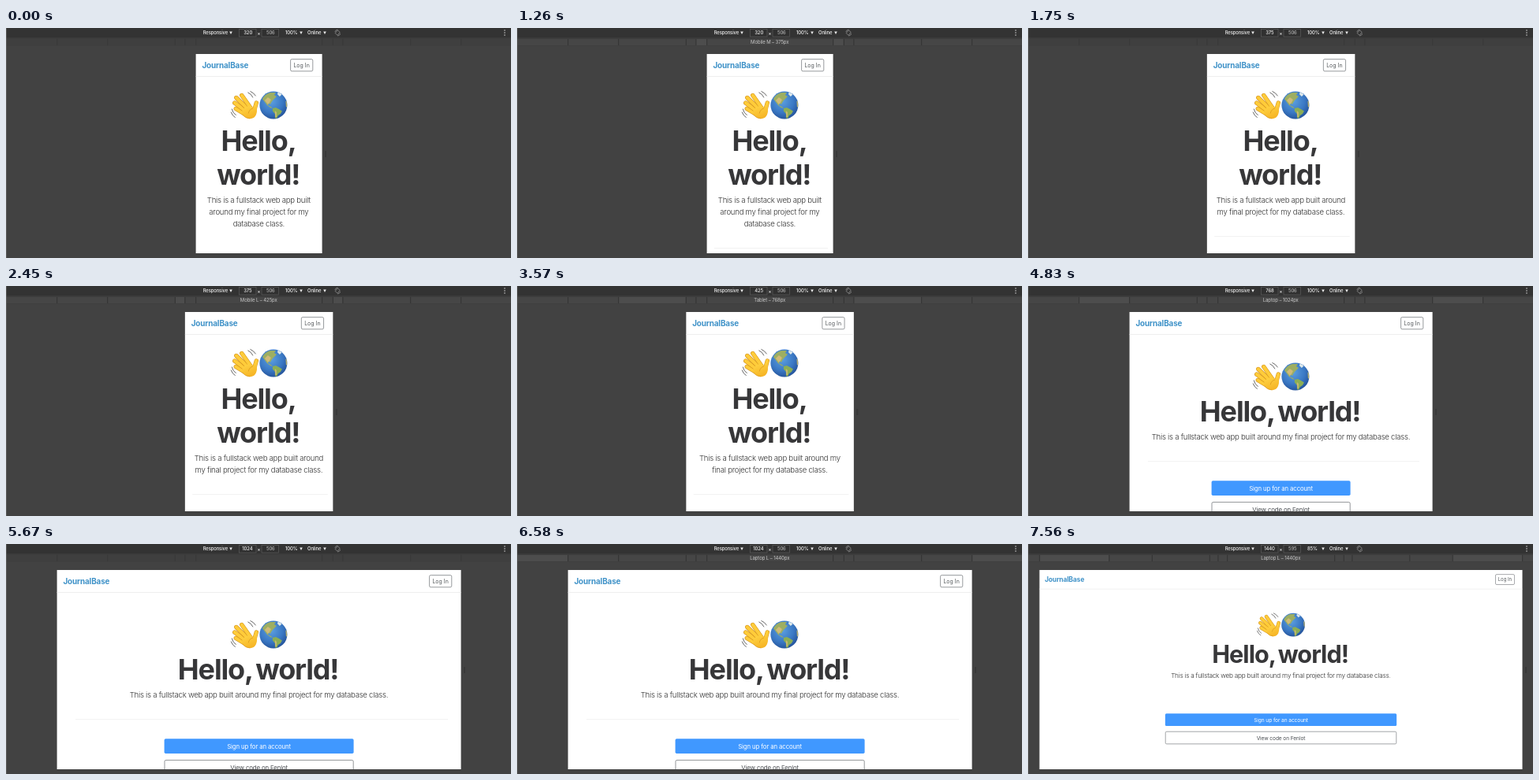
These frames come from a looping animation (640x292 px, 7630 ms). An HTML page:

```html
<!DOCTYPE html>
<html lang="en">
<head>
<meta charset="utf-8">
<title>Responsive page preview</title>
<style>
html, body { margin: 0; width: 100%; height: 100%; overflow: hidden; background: #424242; }
svg { display: block; width: 100vw; height: 100vh; font-family: Inter, "Liberation Sans", sans-serif; }
.tool { font-size: 5.9px; font-weight: 500; letter-spacing: -.12px; fill: #f0f0f0; }
.tool .dim { fill: #b0b0b0; }
.tag { font-size: 6px; letter-spacing: -.1px; fill: #c8c8c8; text-anchor: middle; }
.brand { font-size: 9.9px; font-weight: 700; letter-spacing: -.12px; fill: #3f92c8; }
.login { font-size: 7px; fill: #55595c; text-anchor: middle; }
.title { font-size: 36px; font-weight: 700; letter-spacing: -1.15px; word-spacing: -3px; fill: #373739; text-anchor: middle; }
.lead { font-size: 9.6px; font-weight: 300; letter-spacing: -.25px; fill: #333; text-anchor: middle; }
.btn { font-size: 7.8px; letter-spacing: -.12px; text-anchor: middle; }
</style>
</head>
<body>
<svg id="stage" viewBox="0 0 640 292" preserveAspectRatio="none">
  <defs>
    <radialGradient id="sea" cx=".42" cy=".35" r=".7">
      <stop offset="0" stop-color="#5c9fe0"/><stop offset=".6" stop-color="#3a78c4"/><stop offset="1" stop-color="#234f95"/>
    </radialGradient>
    <linearGradient id="skin" x1="0" y1="0" x2=".5" y2="1">
      <stop offset="0" stop-color="#ffd445"/><stop offset="1" stop-color="#f6b526"/>
    </linearGradient>
    <clipPath id="disc"><circle r="17.3"/></clipPath>
    <clipPath id="view"><rect y="33" width="640" height="253"/></clipPath>
    <g id="hand" fill="none" stroke-linecap="round" stroke-linejoin="round">
      <g id="fingers"></g>
      <path d="M-4 9.500Q-3 4 1 2.500Q5 0 9 3L14.500 2Q16 8 14 12.500Q11 18 5 17Q-1 16 -4 9.500Z" fill="url(#skin)"/>
      <path d="M4.500 10Q5.500 5 10 4M-3 12Q0 16.500 6 16.800" stroke="#dc9a1c" stroke-width=".8"/>
      <path d="M-16.500 5Q-15.500 10 -11.500 12.500M-17.500 9Q-16 13.500 -12.500 15.500M4 -16Q8 -14.500 10 -10M7 -17.500Q11.500 -15.500 13.500 -12" stroke="#555" stroke-width=".9"/>
    </g>
    <g id="globe">
      <circle r="17.500" fill="url(#sea)"/>
      <g clip-path="url(#disc)">
        <path d="M-14 -8Q-11 -14 -4 -16L3 -16L1 -13L4 -11L1 -8L-1 -6L-3 -3L-4 -1L-6 -2.500L-7 0L-3 2L-1 4L-4 3L-8 0L-11 -4Z" fill="#9dae62"/>
        <path d="M-11 -6L-7 -10L-3 -7L-5 -3L-7 -1Z" fill="#d0ba78"/>
        <path d="M-1 4L3 3L7 5L11 7.500L9 11L6 13L4 17L2 16L2 11L-1 7.500Z" fill="#8bae55"/>
        <path d="M2 7L4 9L4 15L2.500 15L2 10Z" fill="#cbb872"/>
        <path d="M6 -17L11 -14L8 -11L5 -14Z" fill="#dfe9ea"/>
        <path d="M15.500 -5L19 -7V4L16 2Z" fill="#b9b06c"/>
      </g>
    </g>
  </defs>
  <g id="scene"></g>
</svg>
<script>
const LOOP = 7630;
const scene = document.getElementById("scene");
const presets = [320, 375, 425, 768, 1024, 1440];
const names = { 375: "Mobile M", 425: "Mobile L", 768: "Tablet", 1024: "Laptop", 1440: "Laptop L" };
// time, page width, hovered preset
const steps = [
  [0, 320, 0], [1120, 320, 375], [1400, 375, 375], [1470, 375, 0],
  [2310, 375, 425], [2660, 425, 425], [2940, 425, 0],
  [3430, 425, 768], [3780, 768, 768], [3990, 768, 0],
  [4830, 768, 1024], [5180, 1024, 1024], [5460, 1024, 0],
  [6440, 1024, 1440], [6790, 1440, 1440]
];
const buttonWidth = { 768: 176, 1024: 240, 1440: 345 };
const leads = {
  320: ["This is a fullstack web app built", "around my final project for my", "database class."],
  375: ["This is a fullstack web app built around", "my final project for my database class."],
  425: ["This is a fullstack web app built around my", "final project for my database class."]
};
const fingers = ["M12 8Q12.500 3 14.500 -3", "M1 12L-11.500 4.500", "M3 9L-13 -3", "M6 7L-11 -9.500", "M9 6L-4 -12.500"];
document.getElementById("fingers").innerHTML = fingers.map(d =>
  `<path d="${d}" stroke="#d2921f" stroke-width="5.400"/><path d="${d}" stroke="#ffcc3a" stroke-width="4.200"/>`).join("");

const text = (cls, x, y, s) => `<text class="${cls}" x="${x}" y="${y}">${s}</text>`;
const rect = (x, y, w, h, fill, more = "") =>
  `<rect x="${x}" y="${y}" width="${w}" height="${h}" fill="${fill}" ${more}/>`;
const arrow = x => `<path d="M${x - 1.8} 4.500h3.600l-1.800 3.400z" fill="#eee"/>`;

function toolbar(w, zoom) {
  const field = 'stroke="#5c5c5c" stroke-width=".7"';
  const wx = w > 999 ? 299.3 : 301.3;
  return rect(0, 0, 640, 12.5, "#333") + `<g class="tool">` +
    text("", 249.7, 8.2, "Responsive") + arrow(285) +
    rect(295.5, 1.5, 21.5, 9.5, "#303030", field) + text("", wx, 8.2, w) +
    text("", 318.6, 9, "×") +
    rect(324, 1.5, 21.5, 9.5, "#303030", field) + text("dim", 330, 8.2, zoom < 1 ? 595 : 506) +
    text("", 354, 8.2, zoom < 1 ? "85%" : "100%") + arrow(374) +
    text("", 382, 8.2, "Online") + arrow(404) + `</g>` +
    `<g fill="none" stroke="#999" stroke-width=".7"><rect x="418.200" y="3.500" width="4" height="5" rx=".6" transform="rotate(40 420.200 6)"/>` +
    `<path d="M416.800 5Q417.500 2.300 420.500 2.100M423.800 7Q423 9.800 420 10"/></g>` +
    [3, 6, 9].map(y => `<circle cx="632" cy="${y}" r=".8" fill="#ccc"/>`).join("");
}

function ruler(hover, zoom) {
  let out = rect(0, 12.5, 640, 10, "#3c3c3c") + rect(0, 14, 640, 8, hover ? "#464646" : "#3f3f3f");
  const half = presets.map(p => p * zoom / 4);
  const i = presets.indexOf(hover);
  if (i > 0) {
    const w = half[i] - half[i - 1];
    out += rect(320 - half[i], 14, w, 8, "#4d4d4d") + rect(320 + half[i - 1], 14, w, 8, "#4d4d4d");
  }
  for (const r of half) for (const x of [320 - r, 320 + r])
    out += rect(x, 14, 1.2, 8, hover ? "#363636" : "#393939");
  if (hover) out += text("tag", 320.3, 20.3, `${names[hover]} – ${hover}px`);
  return out;
}

function page(w, zoom, rule) {
  const half = w / 4, left = 320 - half, right = 320 + half;
  const wide = w > 576;
  const emojiY = wide ? 115 : 98;
  const lines = leads[w] || [leads[320].join(" ")];
  const leadY = wide ? 194.7 : 221.7;
  const ruleY = leadY + lines.length * 15 + 12.7;
  const [padL, padR] = wide ? [24, 16] : [10, 6];
  let out = rect(left + .6, 33, half * 2, 340, "#fff") +
    rect(left + .6, 61, half * 2, .8, "#ececec") +
    text("brand", left + 8.4, 50.6, "JournalBase") +
    rect(right - 39.4, 39.6, 28.2, 15.2, "none", 'rx="1.700" stroke="#6c7075" stroke-width=".7"') +
    text("login", right - 25.4, 49.9, "Log In") +
    `<use href="#hand" x="302.800" y="${emojiY}"/><use href="#globe" x="338.900" y="${emojiY}"/>`;
  out += wide ? text("title", 319.6, 171.6, "Hello, world!")
    : text("title", 320, 156, "Hello,") + text("title", 319.7, 199, "world!");
  lines.forEach((s, i) => out += text("lead", 320.4, leadY + i * 15, s));
  if (rule) out += rect(left + padL, ruleY, half * 2 - padL - padR, .7, "#ececec");
  if (wide) {
    const bw = buttonWidth[w], x = 320.6 - bw / 2;
    out += rect(x, 247.3, bw, 18.7, "#4098ff", 'rx="1.800"') +
      `<g class="btn" fill="#fff">${text("", 320.6, 259.6, "Sign up for an account")}</g>` +
      rect(x + .4, 274.4, bw - .8, 18.4, "#fff", 'rx="1.800" stroke="#65696d" stroke-width=".7"') +
      `<g class="btn" fill="#4b4f53">${text("", 320.6, 286.6, "View code on Fenlot")}</g>`;
  }
  return rect(320 + half * zoom + 4, 156, 2, 8, "#393939") +
    `<g clip-path="url(#view)"><g transform="translate(320 33) scale(${zoom}) translate(-320 -33)">${out}</g></g>`;
}

let shown = -1;
function draw(t) {
  const i = steps.findLastIndex(s => s[0] <= t);
  if (i === shown) return;
  shown = i;
  const [, w, hover] = steps[i];
  const zoom = w === 1440 ? .85 : 1;
  scene.innerHTML = rect(0, 0, 640, 292, "#424242") + toolbar(w, zoom) + ruler(hover, zoom) +
    page(w, zoom, i > 0 && w < 1440) + rect(0, 0, .7, 292, "#6a6a6a");
}

const start = performance.now();
function tick() {
  draw((performance.now() - start) % LOOP);
  requestAnimationFrame(tick);
}
tick();
</script>
</body>
</html>
```
